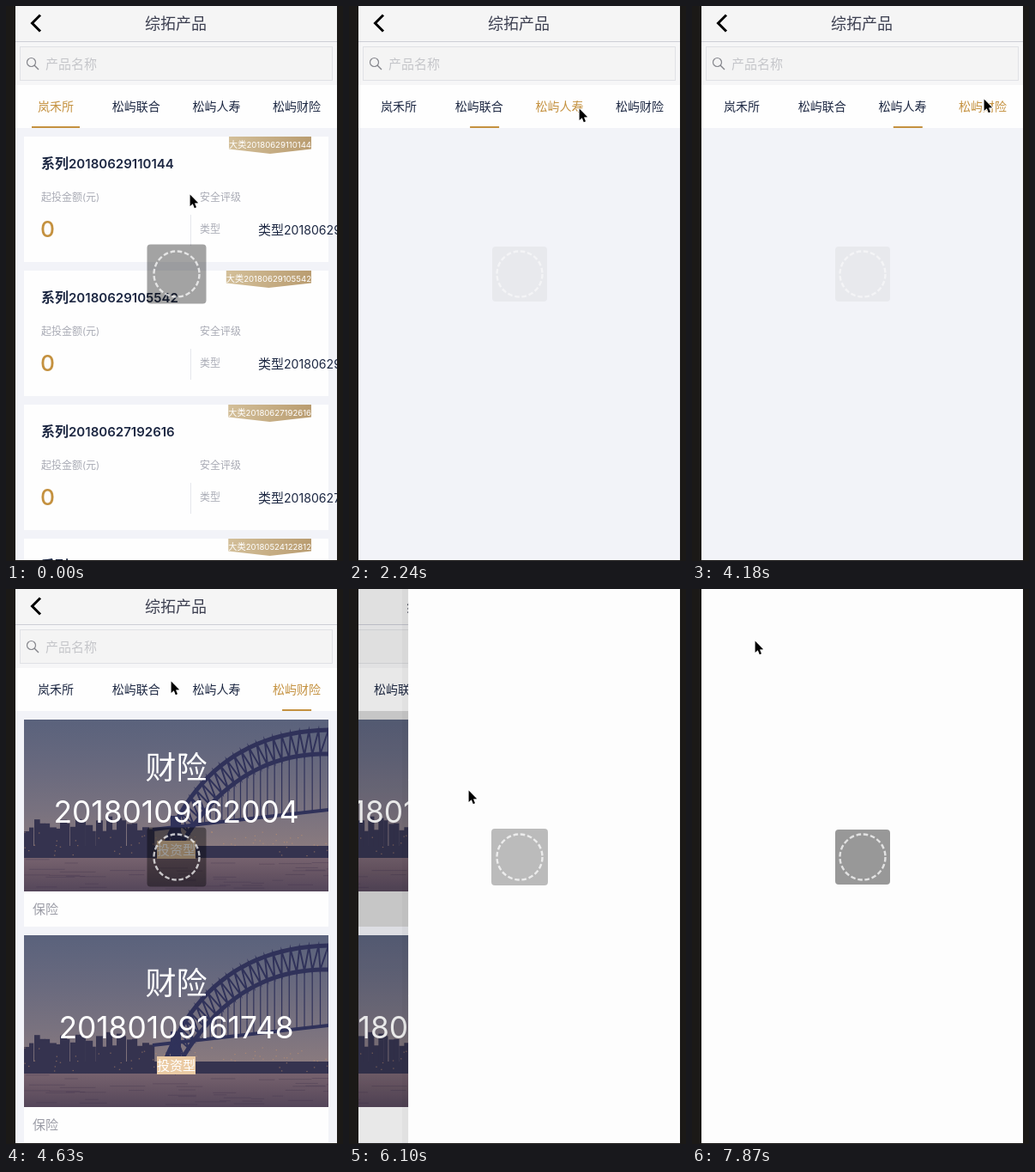
These frames come from a looping animation (393x646 px, 8 s). An HTML page with a canvas:

```html
<!DOCTYPE html>
<html lang="zh-CN">
<head>
<meta charset="utf-8">
<style>
html, body { margin: 0; width: 100%; height: 100%; overflow: hidden; background: #1b1917; }
canvas { display: block; }
</style>
</head>
<body>
<canvas id="stage" width="393" height="646"></canvas>
<script>
const c = document.getElementById('stage').getContext('2d');
const INK = '#1c2742', GOLD = '#c4913f', GREY = '#a9abb5', BG = '#f2f3f8', WHITE = '#fefefe';
const LOOP = 8000, STEP = 148, LOAD_TIME = 440, PRESS = 5500, PUSH = 5950, RELOAD = 7590;

// First and last change of each burst of motion
const bursts = [[150, 600], [900, 1940], [2240, 3130], [4180, 5220], [5360, 5650], [5950, 6970], [7120, 7870]];

// Cursor moves: start, end, then where it arrives
const moves = [[0, 600, 159, 116], [1346, 1940, 268, 119], [2537, 3130, 340, 108],
  [4180, 4625, 192, 107], [5220, 5650, 139, 234], [6970, 7870, 73, 60]];

const tabs = ['岚禾所', '松屿联合', '松屿人寿', '松屿财险'];
const tabStarts = [0, 900, 2240, 4180];
const loaderStarts = [-590, ...tabStarts.slice(1), PUSH, RELOAD];
const tabCenter = i => 58 + 93.7 * i;

const series = ['20180629110144', '20180629105542', '20180627192616', '20180524122812'];
const termLife = ['普通型', '1年', '趸交'], investment = ['投资型b', '5年a', '1.5年'];
const funds = ['稳健', '成长', '平衡'].map(kind => [`松屿联合${kind}系列`, ...termLife, '全部渠道a']);
const policies = [['松屿人寿丰宁系', ...investment, '全部渠道a'], ['松屿团体定期寿险', ...termLife, '团险']];

const clamp = v => Math.max(0, Math.min(1, v));
const lerp = (a, b, u) => a + (b - a) * u;
const easeOut = u => 1 - (1 - clamp(u)) ** 2;

// The picture moves in even steps within each burst and rests in between
function snap(t) {
  const burst = bursts.filter(b => b[0] <= t).pop();
  if (!burst) return 0;
  const [a, b] = burst;
  const step = (b - a) / Math.round((b - a) / STEP);
  return Math.min(b, a + Math.floor((t - a) / step + .01) * step);
}

function rect(x, y, w, h, color) {
  c.fillStyle = color;
  c.fillRect(x, y, w, h);
}

function poly(points, fill) {
  c.beginPath();
  for (const [x, y] of points) c.lineTo(x, y);
  c.closePath();
  c.fillStyle = fill;
  c.fill();
}

function line(points, color, width) {
  c.beginPath();
  for (const [x, y] of points) c.lineTo(x, y);
  c.strokeStyle = color;
  c.lineWidth = width;
  c.stroke();
}

function circle(x, y, r, color, width) {
  c.beginPath();
  c.arc(x, y, r, 0, 2 * Math.PI);
  c.strokeStyle = color;
  c.lineWidth = width;
  c.stroke();
}

function gradient(x0, y0, x1, y1, ...stops) {
  const g = c.createLinearGradient(x0, y0, x1, y1);
  stops.forEach((s, i) => g.addColorStop(i / (stops.length - 1), s));
  return g;
}

// Latin runs use a slightly smaller face than the Chinese ones
function runs(s, size, weight) {
  return s.match(/[\x00-\x7f]+|[^\x00-\x7f]+/g).map(part => {
    const font = part.charCodeAt(0) < 128
      ? `${weight} ${size * .94}px Inter, sans-serif`
      : `${weight} ${size}px "Noto Sans CJK SC", "Noto Sans CJK", sans-serif`;
    c.font = font;
    return { part, font, width: c.measureText(part).width };
  });
}

const total = list => list.reduce((sum, r) => sum + r.width, 0);

// y is the middle of the line; align is 0 left, .5 centre, 1 right
function text(s, x, y, size, color, align = 0, weight = 400) {
  const list = runs(s, size, weight);
  x -= align * total(list);
  c.fillStyle = color;
  for (const r of list) {
    c.font = r.font;
    c.fillText(r.part, x, y + size * .37);
    x += r.width;
  }
}

function ribbon(s, right, y) {
  const size = 10.2, w = Math.max(40, total(runs(s, size, 400)));
  const left = right - w, middle = right - w / 2;
  poly([[left, y], [right, y], [right, y + 14.5], [middle, y + 20], [left, y + 14.5]],
    gradient(left, y, right, y, '#d3bf99', '#b99c70'));
  text(s, middle, y + 9.5, size, '#fff', .5);
}

function seriesPage() {
  series.forEach((id, i) => {
    const y = 152 + 156 * i;
    rect(21, y, 355, 146, WHITE);
    ribbon('大类' + id, 356, y);
    text('系列' + id, 41, y + 31, 16, INK, 0, 600);
    text('起投金额(元)', 41, y + 71, 12, GREY);
    text('安全评级', 226, y + 71, 12, GREY);
    text('0', 40, y + 107, 28, GOLD, 0, 500);
    rect(215, y + 91, 1, 36, '#e6e7ec');
    text('类型', 226, y + 108, 12, GREY);
    text('类型' + id, 294, y + 108, 15, INK);
  });
}

function rowsPage(cards) {
  cards.forEach(([title, tag, ...values], i) => {
    const y = 152 + Math.floor(185.5 * i);
    rect(21, y, 355, 176, WHITE);
    ribbon(tag, 366, y);
    text(title, 31, y + 21, 16, INK, 0, 600);
    ['保险期间', '交易期', '销售渠道'].forEach((label, k) => {
      text(label, 31, y + 61 + 41 * k, 12, GREY);
      text(values[k], 366, y + 63 + 41 * k, 15, INK, 1);
    });
  });
}

function random(seed) {
  return () => (seed = seed * 16807 % 2147483647) / 2147483647;
}

// Quadratic arch from a through the pull of b to d, as a list of points
function arch(a, b, d, n = 24) {
  return Array.from({ length: n + 1 }, (_, i) => {
    const t = i / n;
    return [0, 1].map(k => lerp(lerp(a[k], b[k], t), lerp(b[k], d[k], t), t));
  });
}

function photo(x, y) {
  const steel = '#30325a', city = '#35334f', rnd = random(11);
  c.save();
  c.translate(x, y);
  c.beginPath();
  c.rect(0, 0, 355, 200);
  c.clip();
  rect(0, 0, 355, 162, gradient(0, 0, 0, 162, '#5a627c', '#68697e', '#79727f', '#8f7d7e'));
  rect(0, 160, 355, 40, gradient(0, 160, 0, 200, '#77636f', '#665463', '#54465a'));
  rect(0, 147, 355, 14, city);
  for (let bx = 0; bx < 145; bx += 6) {
    const h = 18 + 24 * rnd() * Math.sin(Math.PI * (bx + 30) / 180);
    rect(bx, 148 - h, 5 + 4 * rnd(), h, city);
  }
  for (let i = 0; i < 70; i++) rect(355 * rnd(), 130 + 28 * rnd(), 1.4, 1.2, 'rgba(200,150,110,.5)');
  for (let i = 0; i < 40; i++) rect(355 * rnd(), 162 + 36 * rnd(), 12 + 30 * rnd(), 1, 'rgba(60,48,75,.3)');

  const outer = arch([163, 150], [215, 15], [355, 12]);
  const inner = arch([175, 160], [240, 38], [355, 40]);
  rect(171, 112, 12, 50, steel);
  line([[150, 128], [355, 105]], steel, 4);
  for (const [hx, hy] of inner) if (hy < 115) line([[hx, hy], [hx, 128 - (hx - 150) * .112]], steel, 1.2);
  line(outer, steel, 5);
  line(inner, steel, 5);
  line(outer.flatMap((point, i) => [point, inner[i]]), steel, 2);
  c.restore();
}

function photoPage(pressed) {
  if (pressed) rect(11, 142, 375, 251, '#d9d9d9');
  ['20180109162004', '20180109161748'].forEach((id, i) => {
    const y = 152 + 251 * i;
    if (i || !pressed) rect(21, y, 355, 241, WHITE);
    photo(21, y);
    text('财险', 198.5, y + 56, 36, '#fff', .5, 300);
    text(id, 198.5, y + 106, 37.6, '#fff', .5);
    rect(176, y + 141, 45, 21, '#ebcba4');
    text('投资型', 198.5, y + 151, 15, '#fff', .5);
    text('保险', 31, y + 220.5, 15, '#9b9ca6');
  });
}

function chrome(q, active) {
  rect(11, 0, 375, 41, '#f5f5f5');
  rect(11, 41, 375, 1, '#cdced6');
  rect(11, 42, 375, 50, '#f6f6f7');
  rect(16, 47, 365, 40, '#e0e1e5');
  rect(17, 48, 363, 38, '#f4f4f4');
  line([[40, 10.5], [30.5, 20], [40, 29.5]], '#000', 3);
  text('综拓产品', 198, 20, 18, '#3c3f50', .5);
  circle(29.5, 65.5, 5, '#85868c', 1.2);
  line([[33, 69], [38, 74]], '#85868c', 1.4);
  text('产品名称', 46, 67, 15, '#c5c6ca');
  rect(11, 92, 375, 50, WHITE);
  tabs.forEach((name, i) => text(name, tabCenter(i), 117, 14, i === active ? GOLD : INK, .5));

  const from = Math.max(0, active - 1);
  const u = easeOut((q - tabStarts[active] + 16) / 460);
  const x = lerp(tabCenter(from), tabCenter(active), u);
  const w = lerp(from ? 34 : 56, active ? 34 : 56, u);
  rect(x - w / 2, 140, w, 2, GOLD);
}

function loader(q) {
  const start = loaderStarts.filter(s => s <= q).pop(), age = q - start;
  const alpha = Math.min(.045 + age * .0015, .4, (890 - age) * .0012);
  if (alpha <= 0) return;
  const size = start < RELOAD ? 64 + Math.min(5, age / 75) : 64;
  c.beginPath();
  c.roundRect(199 - size / 2, 312 - size / 2, size, size, 4);
  c.fillStyle = `rgba(0,0,0,${alpha})`;
  c.fill();
  const dash = 2 * Math.PI * 26.5 / 20;
  c.setLineDash([dash * .67, dash * .33]);
  circle(199, 312, 26.5, `rgba(255,255,255,${Math.min(.72, alpha * 11)})`, 2.4);
  c.setLineDash([]);
}

function cursor(q) {
  let x = 214, y = 219;
  for (const [a, b, toX, toY] of moves) {
    const u = clamp((q - a) / (b - a));
    x = lerp(x, toX, u);
    y = lerp(y, toY, u);
  }
  c.save();
  c.translate(x + .6, y + .6);
  const arrow = [[0, 0], [0, 13.5], [3.2, 10.7], [5.2, 15.6], [7.4, 14.7], [5.4, 9.9], [9.6, 9.7], [0, 0]];
  line(arrow, '#fff', 1.8);
  poly(arrow, '#000');
  c.restore();
}

function draw(q) {
  const active = tabStarts.filter(s => s <= q).length - 1;
  const pages = [seriesPage, () => rowsPage(funds), () => rowsPage(policies), () => photoPage(q >= PRESS)];
  const slide = q < PUSH ? 0 : 1 - .65 * Math.exp((PUSH - q) / 101.6);
  const edge = 11 + 375 * (1 - slide);
  rect(0, 0, 393, 646, '#1b1917');
  c.save();
  c.beginPath();
  c.rect(11, 0, 375, 645);
  c.clip();

  c.save();
  c.translate(-112 * slide, 0);
  rect(11, 0, 375 + 112, 645, BG);
  if (!active || q - tabStarts[active] > LOAD_TIME) pages[active]();
  chrome(q, active);
  c.restore();

  if (slide) {
    rect(11, 0, 375, 645, `rgba(0,0,0,${.1 * slide})`);
    rect(edge - 7, 0, 7, 645, 'rgba(0,0,0,.03)');
    rect(edge, 0, 375, 645, '#fdfdfd');
  }
  loader(q);
  c.restore();
  cursor(q);
}

function frame() {
  draw(snap(performance.now() % LOOP));
  requestAnimationFrame(frame);
}
frame();
</script>
</body>
</html>
```
